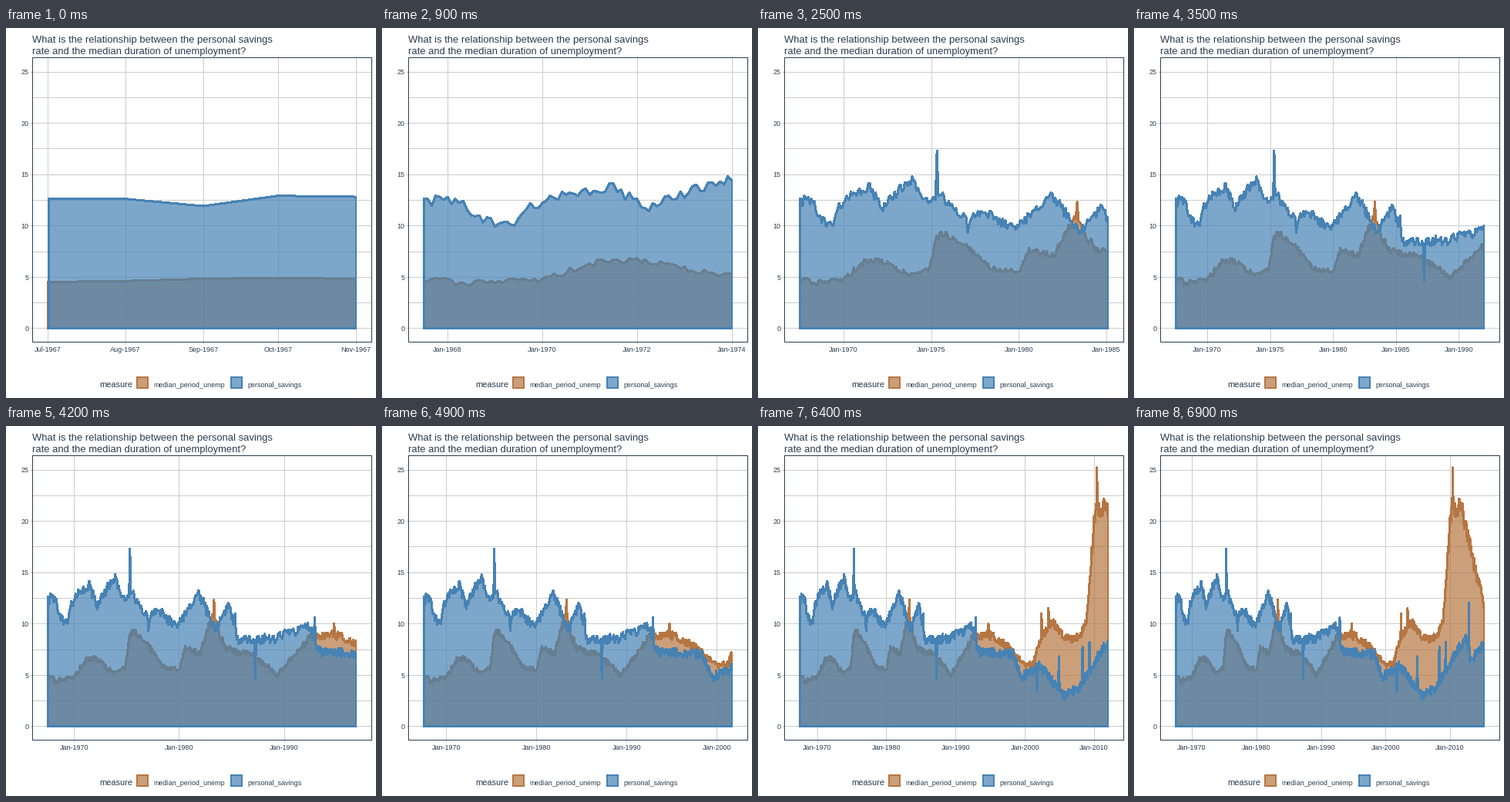
A matplotlib script that plays this animation: 480 px wide and 480 px high, repeating every 10000 ms.

```python
import numpy as np
import matplotlib.pyplot as plt
from matplotlib.animation import FuncAnimation
from matplotlib.patches import Polygon, Rectangle

SIZE, DPI = 480, 80
PT = 72 / DPI                      # points per pixel
INK, GRID = "#2c3e50", "#cccccc"
BROWN, BLUE = "#b57642", "#4682b4"
LEFT, RIGHT, TOP, BOTTOM = 34, 474, 37, 406
X0, X1 = 54, 454
STEPS, FRAMES = 70, 100
FONT = "Liberation Sans"
COUNT = 574                        # months of data, from July 1967
FIRST = 1967 * 12 + 6
NAMES = "Jan Feb Mar Apr May Jun Jul Aug Sep Oct Nov Dec".split()

# Key points of each trend as (month, value), then single-month peaks.
SAVINGS = [
    (0, 12.6), (1, 12.6), (2, 11.9), (3, 12.9), (4, 12.8), (10, 12),
    (13, 10.6), (22, 9.9), (26, 11.6), (36, 13), (48, 13.7), (57, 11.6),
    (65, 13), (77, 14.6), (85, 12.5), (96, 13), (114, 10.5), (126, 11.3),
    (147, 9.6), (173, 12.9), (192, 9.4), (207, 11.7), (218, 8.2),
    (260, 8.6), (299, 9.7), (309, 7.3), (370, 7), (384, 4.8), (416, 5.9),
    (457, 3), (485, 3.7), (513, 6.5), (540, 8.6), (547, 6.4), (573, 7.9),
]
SAVINGS_PEAKS = {94: 17.3, 115: 9.3, 214: 11, 237: 4.6, 305: 10.6,
                 411: 3.4, 449: 6.8, 490: 7.7, 502: 8.2, 545: 12}
UNEMP = [
    (0, 4.5), (3, 4.9), (8, 4.4), (28, 4.6), (46, 6.6), (57, 6.6),
    (75, 5.1), (89, 5.8), (94, 9), (101, 9.2), (120, 7.2), (131, 5.9),
    (150, 5.5), (157, 7.5), (174, 7.1), (188, 10.6), (203, 7.6),
    (234, 6.9), (262, 5), (300, 8.7), (326, 9), (357, 7.9), (392, 5.9),
    (405, 6.1), (418, 8.7), (437, 10.2), (460, 8.6), (485, 8.6),
    (497, 10.3), (511, 20.6), (529, 21.9), (548, 17.3), (573, 11.8),
]
UNEMP_PEAKS = {190: 12.3, 327: 10, 419: 11, 431: 11.5, 515: 25.2}


def monthly(points, peaks, seed, flat, slope):
    """Trend through the points plus noise that grows with the value."""
    at, value = np.array(points).T
    trend = np.interp(np.arange(COUNT), at, value)
    noise = np.random.default_rng(seed).uniform(-1, 1, COUNT)
    noise[:5] = 0
    series = trend + noise * (flat + slope * trend)
    series[list(peaks)] = list(peaks.values())
    return np.round(series, 1)


savings = monthly(SAVINGS, SAVINGS_PEAKS, 4, 0.5, 0)
unemp = monthly(UNEMP, UNEMP_PEAKS, 9, 0, 0.05)
months = np.datetime64("1967-07") + np.arange(COUNT)
days = months.astype("datetime64[D]").astype(float)
days -= days[0]


def y_px(v):
    unit = (BOTTOM - TOP) / (25.2 * 1.1)
    return BOTTOM - 0.8 - (v + 1.26) * unit


def x_px(d, last):
    return X0 + (X1 - X0) * d / days[last]


def breaks(last):
    """Month numbers of the date labels, about five intervals."""
    def fit(step):
        count = -(-(FIRST + last) // step) - FIRST // step
        return abs(count - 5), abs(last / step - 5)

    step = min((1, 3, 6, 12, 24, 60, 120), key=fit)
    return [m for m in range(last + 1) if (FIRST + m) % step == 0]


fig = plt.figure(figsize=(SIZE / DPI, SIZE / DPI), dpi=DPI, facecolor="white")
ax = fig.add_axes([0, 0, 1, 1])
ax.set_xlim(0, SIZE)
ax.set_ylim(SIZE - 1, -1)          # whole numbers are pixel rows and columns
ax.axis("off")


def line(xs, ys):
    return ax.plot(xs, ys, color=GRID, lw=PT, zorder=1,
                   solid_capstyle="butt")[0]


def label(x, y, s, px, ha="left"):
    return ax.text(x, y, s, fontsize=px * PT, family=FONT, color=INK,
                   ha=ha, va="baseline", zorder=5)


def area(color, corners, z):
    patch = Polygon(corners, closed=True, facecolor=(color, 0.7),
                    edgecolor=color, lw=2 * PT, joinstyle="round",
                    antialiased=False, zorder=z)
    return ax.add_patch(patch)


def square(x, y, side):
    return [(x, y), (x + side, y), (x + side, y + side), (x, y + side)]


label(34, 18, "What is the relationship between the personal savings", 13)
label(34, 33, "rate and the median duration of unemployment?", 13)

for half in range(11):
    y = y_px(half * 2.5)
    major = half % 2 == 0
    line([LEFT - 3 if major else LEFT, RIGHT], [y, y])
    if major:
        label(29.5, y + 3.7, str(half * 5 // 2), 9, "right")

grid = [line([0, 0], [TOP, BOTTOM + 3]) for _ in range(10)]
dates = [label(0, 419, "", 9, "center") for _ in range(10)]
areas = [(area(BROWN, square(0, 0, 1), 2), unemp, 0.0),
         (area(BLUE, square(0, 0, 1), 3), savings, 0.5)]
ax.add_patch(Rectangle((LEFT, TOP), RIGHT - LEFT, BOTTOM - TOP, fill=False,
                       edgecolor=INK, lw=PT, zorder=4))

label(121.5, 465, "measure", 11)
for x, color, name in ((170, BROWN, "median_period_unemp"),
                       (292, BLUE, "personal_savings")):
    area(color, square(x, 452, 14), 3)
    label(x + 21.5, 465, name, 9)


def draw(frame):
    k = min(frame, STEPS - 1)
    last = min(4 + k * 58 // 7, COUNT - 1)

    for patch, series, delay in areas:
        d = days[:last + 1].copy()
        d[0] += delay
        xs = np.pad(x_px(d, last), 1, mode="edge")
        ys = y_px(np.pad(series[:last + 1], 1))
        patch.set_xy(np.column_stack([xs, ys]))

    marks = breaks(last)
    for i, (rule, text) in enumerate(zip(grid, dates)):
        shown = i < len(marks)
        rule.set_visible(shown)
        text.set_visible(shown)
        if shown:
            x = x_px(days[marks[i]], last)
            year, month = divmod(FIRST + marks[i], 12)
            rule.set_xdata([x, x])
            text.set_x(x)
            text.set_text(f"{NAMES[month]}-{year}")
    return []


anim = FuncAnimation(fig, draw, frames=FRAMES, interval=100,
                     init_func=lambda: draw(0), repeat=True, repeat_delay=0,
                     blit=False)
plt.show()
```
